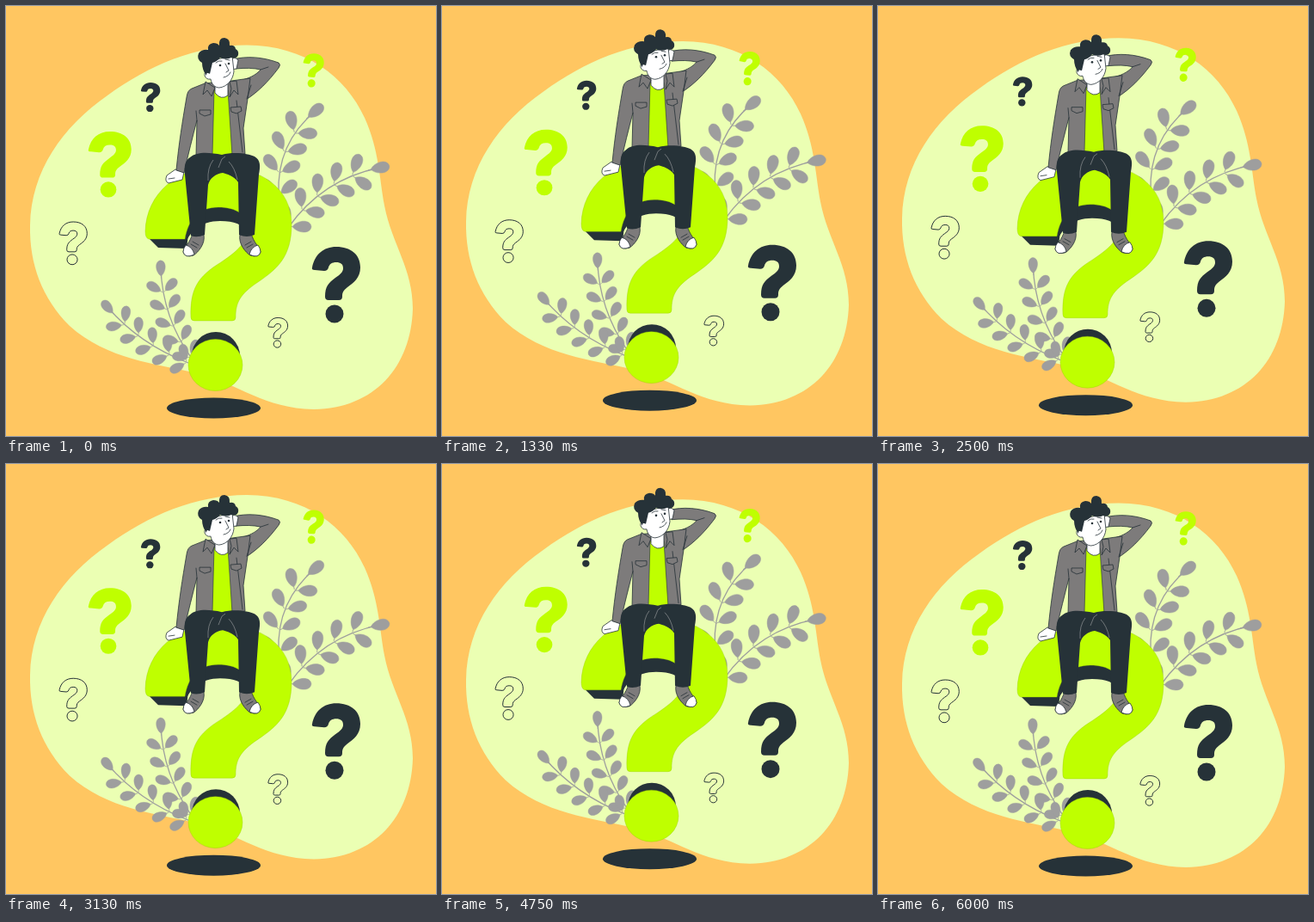
Recreate the animation shown at these times as an HTML page. Size 500 px wide and 500 px high, loop 6.04 s.

```html
<!DOCTYPE html>
<html lang="en">
<head>
<meta charset="utf-8">
<title>Thinking</title>
<style>
  html, body { margin: 0; height: 100%; overflow: hidden; background: #ffc661; }
  svg { display: block; width: 100vw; height: 100vh; }
  .dark { fill: #263238; }
  .lime { fill: #bfff00; }
  .thin { fill: none; stroke: #263238; stroke-width: 1; }
  #mark * { vector-effect: non-scaling-stroke; }
  .leaf { fill: #9e9e9e; stroke: #9e9e9e; stroke-width: .5; }
  .stem { fill: none; stroke: #9e9e9e; stroke-width: 1.3; }
  .cloth { fill: #7d7b7b; stroke: #263238; stroke-width: .8; stroke-linejoin: round; }
  .skin { fill: #fff; stroke: #263238; stroke-width: .8; stroke-linejoin: round; }
  .line { fill: none; stroke: #263238; stroke-width: .8; stroke-linecap: round; }
</style>
</head>
<body>
<svg viewBox="0 0 500 500">
  <defs>
    <g id="mark">
      <path d="M1 24C4 9 14 0 29 0C46 0 57 9 57 24C57 36 49 42 42 47C37 51 36 53 36 58Q36 62 32 62H20Q16 62 16 58C16 46 20 42 28 36C34 32 37 29 37 25C37 20 34 18 29 18C24 18 21 20 20 24Q19 28 15 28L4 27Q0 27 1 24Z"/>
      <circle cx="27" cy="78" r="10.5"/>
    </g>
    <g id="shoe">
      <path class="cloth" d="M217 264L230 266C232 276 224 286 218 290Q208 293 206 286C207 280 214 276 217 264Z"/>
      <path class="skin" d="M209 278Q217 280 219 289Q208 294 206 286Q206 282 209 278Z"/>
      <path class="line" d="M217 274L224 278M215 277L222 281"/>
    </g>
  </defs>

  <path id="blob" fill="#ebffb3" d="M28 255C29 192 66 140 118 104C166 69 220 46 280 45.5C348 46 395 82 417 130C434 168 434 200 440 232C449 278 473 305 473 352C471 420 428 468 358 469C300 468 272 440 222 427C175 416 117 411 74 372C42 340 27 300 28 255Z"/>

  <g id="marks">
    <use href="#mark" class="lime" transform="translate(95 146)scale(.89 .865)"/>
    <use href="#mark" class="dark" transform="translate(156.5 89)scale(.4 .385)"/>
    <use href="#mark" class="lime" transform="translate(346 54.5)rotate(4)scale(.43 .445)"/>
    <use href="#mark" class="dark" transform="translate(355 280)"/>
    <use href="#mark" class="thin" transform="translate(61.5 251)scale(.575 .562)"/>
    <use href="#mark" class="thin" transform="translate(304.5 362.5)scale(.405 .392)"/>
  </g>

  <g id="float">
    <ellipse class="dark" cx="241.5" cy="467.5" rx="54.5" ry="12"/>
    <g id="right"></g>
    <g id="left"></g>

    <path class="dark" d="M164 268L177 281L210 282L212 265Z"/>
    <path class="dark" d="M207 282C212 262 226 250 249 250C266 250 274 254 281 262L290 240L250 225L210 240Z"/>
    <path class="lime" stroke="#98cc00" stroke-width=".4" d="M162 262C163 218 200 187 247 187C298 187 332 213 332 254C332 292 315 306 293 321C272 335 267 345 267 362Q267 366 263 366H219Q215 366 215 362C214 330 222 315 250 298C274 282 281 272 281 258C281 243 268 234 247 234C224 234 212 248 208 271L166 271Q162 270 162 262Z"/>
    <circle class="dark" cx="244" cy="407" r="28"/>
    <ellipse class="lime" stroke="#98cc00" stroke-width=".4" cx="243.5" cy="417.5" rx="31.5" ry="30"/>

    <use href="#shoe"/>
    <use href="#shoe" transform="translate(502)scale(-1 1)"/>

    <path class="skin" d="M197 190L207 193L205 202L189 206Q184 204 187 197Z"/>
    <path class="line" d="M189 201L196 200"/>
    <path class="cloth" d="M264 62C280 58 298 59 317 66Q320 68 317 72C305 88 293 100 279 109L275 86C286 83 293 78 296 74C288 72 278 72 267 73Z"/>
    <path class="cloth" d="M231 90L216 96Q211 98 210 106C205 135 201 160 198 191L207 194C212 172 217 152 222 133L221 174L278 172L276 142L281 108L284 84L262 87Z"/>
    <path class="line" d="M222 133L221 122M280 108L285 92M296 74L305 71M268 110L275 170"/>
    <path class="lime" stroke="#263238" stroke-width=".6" d="M242 98L258 98L263 174L240 174Z"/>
    <path class="skin" d="M243 85L243 101Q250 110 258 104L258 85Z"/>
    <path class="cloth" d="M232 88L229 103L234 98L239 105L243 95ZM260 88L262 96L260 106L265 98L270 103L268 87Z"/>
    <path class="cloth" d="M225 121L238 121L238 126L231 128L225 125ZM261 118L273 117L274 122L268 125L262 123Z"/>

    <path class="dark" d="M214 176C222 169 236 170 251 173C266 169 282 172 289 175C296 179 296 186 294 196L289 266Q280 270 271 266L270 205C266 198 256 195 252 194C244 195 237 200 235 208L231 266Q222 270 215 267L208 196C207 186 208 180 214 176Z"/>
    <path fill="none" stroke="#bbb" stroke-width=".5" d="M235 203Q234 188 241 179M269 202Q266 188 259 181M247 188L251 178L255 175"/>

    <g id="head">
      <path class="skin" d="M260 63Q266 58 270 63L268 73L261 74Z"/>
      <path class="skin" d="M237 64L236 78Q230 75 231 81Q233 86 238 85C239 91 243 95 248 95C257 94 264 86 265 76L263 58Z"/>
      <path class="dark" d="M228 66Q221 62 224 55Q228 50 235 51Q234 44 241 43Q246 43 248 46Q247 37 254 37Q261 38 260 46Q266 45 267 50Q271 52 270 57Q268 62 262 60Q255 63 249 60Q245 65 240 66L237 79Q233 76 233 81Q228 74 228 66Z"/>
      <path class="line" d="M244 66Q247 63 251 64M255 62L260 63M255 67L259 75L256 77M253 83Q259 82 261 77"/>
      <circle class="dark" cx="249" cy="69" r="1.3"/>
      <circle class="dark" cx="259" cy="67" r="1.3"/>
    </g>
  </g>
</svg>
<script>
const $ = id => document.getElementById(id);

// A curved stem with a leaf at its tip and evenly spaced pairs below it.
function branch(group, size, pairs, [x0, y0], [x1, y1], [x2, y2]) {
  let svg = `<path class="stem" d="M${x0} ${y0}Q${x1} ${y1} ${x2} ${y2}"/>`;
  const leaf = (t, side) => {
    const u = 1 - t;
    const a = Math.atan2(u * (y1 - y0) + t * (y2 - y1), u * (x1 - x0) + t * (x2 - x1));
    const d = 12 * size * side;
    const x = u * u * x0 + 2 * u * t * x1 + t * t * x2 - d * Math.sin(a);
    const y = u * u * y0 + 2 * u * t * y1 + t * t * y2 + d * Math.cos(a);
    const turn = a * 180 / Math.PI + 52 * side;
    svg += `<path class="leaf" transform="translate(${x} ${y})rotate(${turn})scale(${size})"
      d="M-14 0L-11 0C-5 -8 10 -9 11 0C10 9 -5 8 -11 0Z"/>`;
  };
  leaf(1, 0);
  for (let i = 1; i <= pairs; i++) {
    leaf(1 - .92 * i / pairs, -1);
    leaf(1 - .92 * i / pairs, 1);
  }
  $(group).innerHTML += svg;
}

branch('right', 1, 4, [317, 220], [314, 160], [360, 122]);
branch('right', 1, 5, [328, 258], [368, 201], [435, 188]);
branch('left', .83, 5, [216, 410], [182, 362], [180, 305]);
branch('left', .83, 5, [212, 415], [155, 393], [118, 350]);

// Linear 0 → 1 → 0 over one period.
const wave = (t, period) => 1 - Math.abs(1 - 2 * (t % period) / period);
const move = (id, value) => $(id).setAttribute('transform', value);
const lift = (id, amount) => move(id, `translate(0 ${-amount})`);

function draw(now) {
  const t = now % 6040;
  const k = wave(t, 3000);
  lift('blob', 10 * wave(t, 6000));
  lift('marks', 10 * wave(t, 1500));
  lift('float', 10 * k);
  lift('head', k);
  move('right', `rotate(${.5 * k} 328 250)`);
  move('left', `rotate(${.5 * k} 216 415)`);
  requestAnimationFrame(draw);
}
requestAnimationFrame(draw);
</script>
</body>
</html>
```
